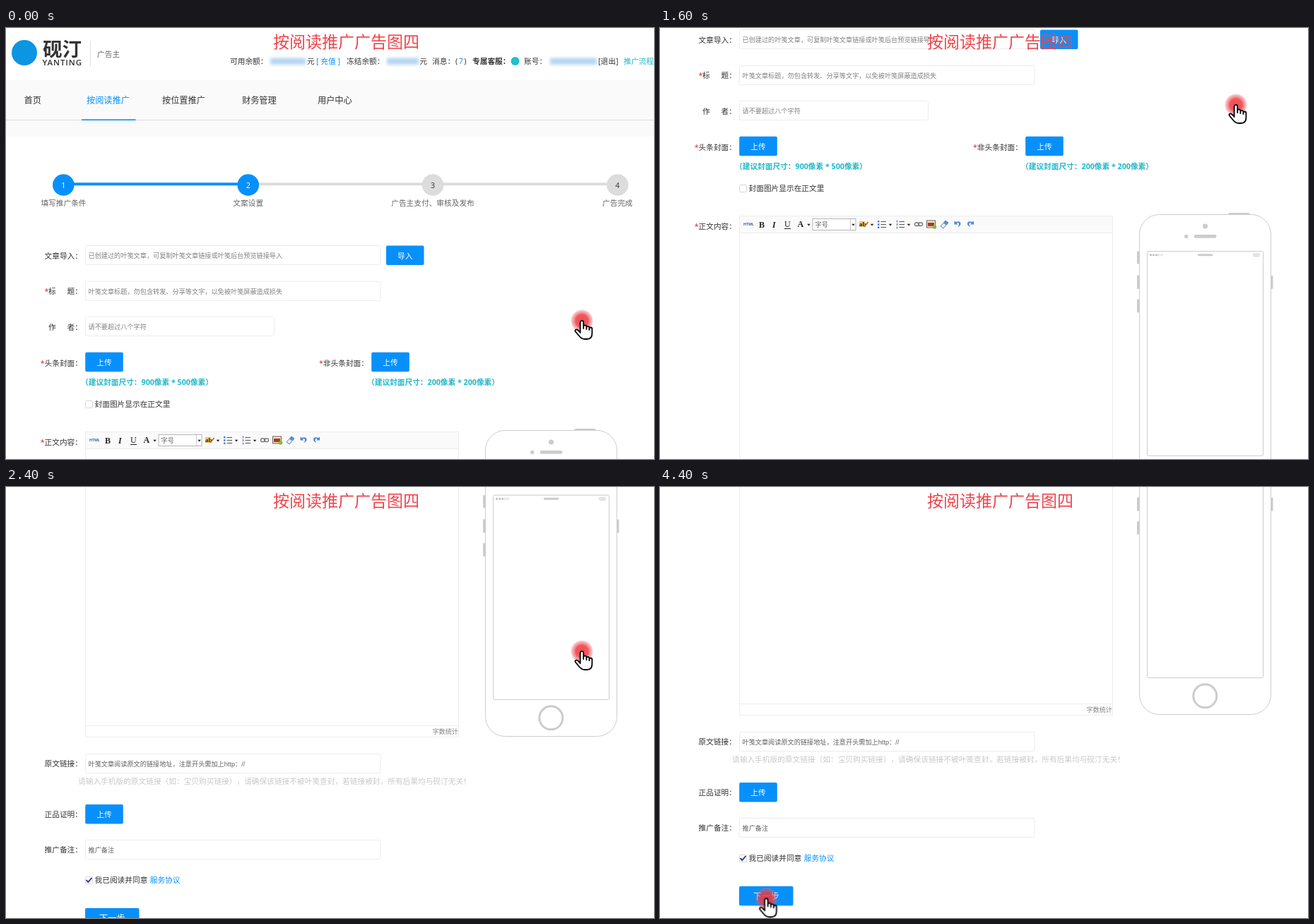
Animation, 917 px wide and 611 px high, one loop 7.4 s. Source, as an HTML page:

```html
<!DOCTYPE html>
<html lang="zh-CN">
<head>
<meta charset="utf-8">
<title>按阅读推广广告图四</title>
<style>
  html, body { margin: 0; width: 100%; height: 100%; overflow: hidden; background: #fff; }
  svg { display: block; }
  text {
    font: 10.7px "Open Sans", "Noto Sans CJK SC", "Noto Sans CJK", sans-serif;
    text-spacing-trim: space-all;
    white-space: pre;
    fill: #333;
  }
  /* centred full-width colon and exclamation mark */
  .c { font-family: "Noto Sans CJK JP", "Noto Sans CJK SC", sans-serif; }
  .label { text-anchor: end; }
  .mid { text-anchor: middle; }
  .white { fill: #fff; }
  .blue { fill: #0890fa; }
  .teal { fill: #1fb8cb; }
  .red { fill: #e02020; }
  .grey { fill: #666; }
  .pale { fill: #c8c8c8; }
  .bold { font-weight: 700; }
  .nav text { font-size: 12.2px; }
  .hint { font-family: "Liberation Sans", "Noto Sans CJK SC", "Noto Sans CJK", sans-serif; font-size: 9.17px; fill: #808080; }
  .dark { fill: #606060; }
  .next { font-size: 12.2px; }
  .serif { font: bold 12px "Liberation Serif", serif; fill: #222; }
  .italic { font-style: italic; }
  .thin { font-weight: 400; }
  .small { font-size: 9px; }
  .brand { font-size: 27.5px; }
  .latin { font-size: 11.5px; font-weight: 600; letter-spacing: .9px; }
  .code { font-size: 5.2px; font-weight: 700; fill: #3563a8; }
  .title { font-size: 23px; fill: #f0444a; }
  .field { fill: #fff; stroke: #ececec; }
  .box { fill: #fff; stroke: #d6d6d6; }
  .line { fill: none; stroke: #ccc; }
  .solid { fill: #ccc; }
  .blur { fill: #b5d6f2; filter: blur(2.2px); }

  #page, #cursor, #ring { animation: 7.4s step-end infinite; }
  #page { animation-name: scroll; }
  #cursor { animation-name: point; }
  #ring { animation-name: press; }

  @keyframes scroll {
    0% { transform: translateY(0); }
    13.5135% { transform: translateY(-76px); }
    16.2162% { transform: translateY(-153px); }
    18.9189% { transform: translateY(-229px); }
    21.6216% { transform: translateY(-306px); }
    24.3243% { transform: translateY(-382px); }
    27.027% { transform: translateY(-458px); }
    29.7297% { transform: translateY(-535px); }
    32.4324% { transform: translateY(-611px); }
    35.1351% { transform: translateY(-626px); }
    37.8378%, 100% { transform: translateY(-642px); }
  }
  @keyframes point {
    0% { transform: translate(815px, 415px); }
    27.027% { transform: translate(815px, 844px); }
    51.3513%, 100% { transform: translate(150.5px, 1225.5px); }
  }
  @keyframes press {
    0% { transform: scale(1); }
    51.3513% { transform: scale(.45); }
    54.054% { transform: scale(.68); }
    56.7567% { transform: scale(.87); }
    59.4594%, 100% { transform: scale(1); }
  }
</style>
</head>
<body>
<svg width="917" height="611" viewBox="0 0 917 611">
  <defs>
    <radialGradient id="glow">
      <stop offset="0" stop-color="#ee343a" stop-opacity=".88"/>
      <stop offset=".56" stop-color="#ee3a40" stop-opacity=".85"/>
      <stop offset=".74" stop-color="#f04a50" stop-opacity=".6"/>
      <stop offset=".9" stop-color="#f26066" stop-opacity=".42"/>
      <stop offset="1" stop-color="#f26066" stop-opacity=".25"/>
    </radialGradient>
    <circle id="dot" r="15.3"/>
    <path id="caret" d="M-2.3-1.2h4.6L0 1.5z" fill="#222"/>
    <path id="rows" d="M0-4h7.5M0 0h7.5M0 4h7.5" stroke="#555" stroke-width="1.1"/>
    <path id="turn" d="M-4-4.5v5h5l-1.8-1.8q3-1.6 3.4 1 .2 2.2-2 4 4.6-1 4.4-4.8Q4.2-5.5-2.3-2.9z" fill="#4d87d6"/>
    <g id="upload">
      <rect width="53.6" height="27.5" rx="2" class="blue"/>
      <text x="26.8" y="18.2" class="mid white">上传</text>
    </g>
  </defs>

  <g id="page">
    <!-- header -->
    <circle cx="26" cy="35" r="18" fill="#0c95e2"/>
    <text x="52" y="40" class="bold brand">砚汀</text>
    <text x="51.5" y="52.5" class="latin">YANTING</text>
    <path d="M119.5 19v35" stroke="#ddd"/>
    <text x="129" y="40.5" class="grey">广告主</text>
    <text x="317" y="51">可用余额<tspan class="c">：</tspan></text>
    <rect x="374" y="42.5" width="50" height="9.5" class="blur"/>
    <text x="426" y="51">元</text>
    <text x="439" y="51" class="blue">[ 充值 ]</text>
    <text x="482" y="51">冻结余额<tspan class="c">：</tspan></text>
    <rect x="539" y="42.5" width="45" height="9.5" class="blur"/>
    <text x="585.5" y="51">元</text>
    <text x="603" y="51">消息<tspan class="c">：</tspan></text>
    <text x="636" y="51" letter-spacing="1.5">(<tspan class="blue">7</tspan>)</text>
    <text x="660" y="51" class="bold">专属客服<tspan class="c">：</tspan></text>
    <circle cx="720.5" cy="47" r="6" fill="#22bfcd"/>
    <text x="733" y="51">账号<tspan class="c">：</tspan></text>
    <rect x="770" y="42.5" width="66" height="9.5" class="blur"/>
    <text x="838" y="51">[退出]</text>
    <text x="874" y="51" class="teal">推广流程</text>

    <!-- navigation -->
    <rect y="73.5" width="917" height="80.5" fill="#fafafa"/>
    <path d="M0 130.5h917" stroke="#dcdcdc"/>
    <rect x="107" y="129.4" width="76.5" height="1.6" class="blue"/>
    <g class="nav">
      <text x="25.5" y="107">首页</text>
      <text x="114" y="107" class="blue">按阅读推广</text>
      <text x="221" y="107">按位置推广</text>
      <text x="334" y="107">财务管理</text>
      <text x="441" y="107">用户中心</text>
    </g>

    <!-- steps -->
    <path d="M342 221.2h523" stroke="#dcdcdc" stroke-width="4"/>
    <path d="M81 221.2h261" stroke="#0890fa" stroke-width="4"/>
    <g class="blue"><use href="#dot" x="81.3" y="222.5"/><use href="#dot" x="342.7" y="222.5"/></g>
    <g fill="#dcdcdc"><use href="#dot" x="604" y="222.5"/><use href="#dot" x="865.4" y="222.5"/></g>
    <g class="mid">
      <text x="81.3" y="226.5" class="white">1</text>
      <text x="342.7" y="226.5" class="white">2</text>
      <text x="604" y="226.5">3</text>
      <text x="865.4" y="226.5">4</text>
      <text x="81.5" y="252" class="grey">填写推广条件</text>
      <text x="342.7" y="252" class="grey">文案设置</text>
      <text x="604" y="252" class="grey">广告主支付、审核及发布</text>
      <text x="865.4" y="252" class="grey">广告完成</text>
    </g>

    <!-- article fields -->
    <text x="108" y="327" class="label">文章导入<tspan class="c">：</tspan></text>
    <rect x="112.5" y="308.5" width="417.5" height="27" rx="2" class="field"/>
    <text x="116.5" y="326" class="hint">已创建过的叶笺文章，可复制叶笺文章链接或叶笺后台预览链接导入</text>
    <rect x="538" y="308.5" width="53.5" height="27.5" rx="2" class="blue"/>
    <text x="564.8" y="326.5" class="mid white">导入</text>

    <text x="54.5" y="377"><tspan class="red">*</tspan><tspan x="60">标</tspan><tspan x="86.5">题</tspan><tspan class="c">：</tspan></text>
    <rect x="112.5" y="359.5" width="417.5" height="27" rx="2" class="field"/>
    <text x="116.5" y="376.5" class="hint">叶笺文章标题，勿包含转发、分享等文字，以免被叶笺屏蔽造成损失</text>

    <text x="60" y="428">作<tspan x="86.5">者</tspan><tspan class="c">：</tspan></text>
    <rect x="112.5" y="409.5" width="267" height="27" rx="2" class="field"/>
    <text x="116.5" y="427" class="hint">请不要超过八个字符</text>

    <text x="108" y="478.5" class="label"><tspan class="red">*</tspan>头条封面<tspan class="c">：</tspan></text>
    <use href="#upload" x="112.2" y="459.8"/>
    <text x="513" y="478.5" class="label"><tspan class="red">*</tspan>非头条封面<tspan class="c">：</tspan></text>
    <use href="#upload" x="517.2" y="459.8"/>
    <text x="106" y="506" class="teal bold">（建议封面尺寸<tspan class="c">：</tspan>900像素 * 500像素）</text>
    <text x="511" y="506" class="teal bold">（建议封面尺寸<tspan class="c">：</tspan>200像素 * 200像素）</text>

    <rect x="112.5" y="528.5" width="10" height="10" rx="1" class="box"/>
    <text x="125.5" y="537">封面图片显示在正文里</text>

    <!-- editor -->
    <text x="108" y="590.5" class="label"><tspan class="red">*</tspan>正文内容<tspan class="c">：</tspan></text>
    <rect x="112.5" y="572.5" width="528" height="393" class="field"/>
    <rect x="113" y="573" width="527" height="23" fill="#fafafa"/>
    <path d="M113 596.5h527M113 949.5h527" stroke="#ececec"/>
    <text x="640" y="961" class="hint label">字数统计</text>
    <text x="118" y="586" class="code">HTML</text>
    <text x="140" y="588.5" class="serif">B</text>
    <text x="159" y="588.5" class="serif italic">I</text>
    <text x="176" y="588" class="serif thin">U</text>
    <path d="M176 590.5h9" stroke="#222"/>
    <text x="194.5" y="588" class="serif">A</text>
    <use href="#caret" x="210.5" y="585"/>
    <rect x="216" y="576.5" width="61" height="16" fill="#fff" stroke="#b5b5b5"/>
    <path d="M269.5 577v15" stroke="#ccc"/>
    <text x="219.5" y="588" class="hint dark">字号</text>
    <use href="#caret" x="273.5" y="585"/>
    <rect x="282" y="580" width="8" height="8" fill="#f2c766"/>
    <text x="282" y="587" class="serif small">ab</text>
    <path d="M289 588l5.500-7" stroke="#b06c28" stroke-width="1.8"/>
    <use href="#caret" x="300" y="585"/>
    <path d="M309.2 579v2.5M309.2 583.2v2.5M309.2 587.4v2.5" stroke="#4a7fd0" stroke-width="2.4"/>
    <use href="#rows" x="312.5" y="584.5"/>
    <use href="#caret" x="326" y="585"/>
    <path d="M335.5 578.5v3M335.5 583v3M335.5 587.5v3" stroke="#4a7fd0" stroke-width="1.3"/>
    <use href="#rows" x="338.5" y="584.5"/>
    <use href="#caret" x="352" y="585"/>
    <g fill="none" stroke="#777" stroke-width="1.3">
      <rect x="360.5" y="582" width="6" height="4.5" rx="2"/>
      <rect x="365.5" y="582" width="6" height="4.5" rx="2"/>
    </g>
    <rect x="377.5" y="579" width="12" height="10" fill="#f7e3b4" stroke="#666"/>
    <path d="M379 582h9v5h-9z" fill="#a33c2c"/>
    <circle cx="388.5" cy="588" r="2.8" fill="#7dbd3a"/>
    <path d="M397 587l7-8 4 3-7 8z" fill="#e6edf8" stroke="#5b7fb5"/>
    <path d="M404 579l4 3-3 3.500-4-3z" fill="#5c8dd6"/>
    <use href="#turn" x="420.5" y="584"/>
    <use href="#turn" transform="translate(440 584) scale(-1 1)"/>

    <!-- phone -->
    <g class="solid">
      <path d="M804 570.5q0-2.5 3-2.5h25q3 0 3 2.500z"/>
      <rect x="675" y="622.5" width="3" height="18" rx="1"/>
      <rect x="675" y="656.5" width="3" height="19.5" rx="1"/>
      <rect x="675" y="690.5" width="3" height="19" rx="1"/>
      <rect x="865" y="657" width="2.5" height="19" rx="1"/>
      <circle cx="771.5" cy="587" r="3.6"/>
      <circle cx="744.7" cy="601.5" r="2.7"/>
      <rect x="755.5" y="599" width="32" height="4.8" rx="2.4"/>
      <rect x="761" y="626.3" width="21" height="3" rx="1"/>
    </g>
    <rect x="678.5" y="570.5" width="186" height="394" rx="28" class="line"/>
    <rect x="689.5" y="622.5" width="164" height="290" rx="1" class="line"/>
    <circle cx="771.3" cy="938.3" r="16.5" class="line" stroke-width="3"/>
    <path d="M694.5 627.8h10" stroke="#bbb" stroke-width="3" stroke-linecap="round" stroke-dasharray="0 4"/>
    <g class="line" stroke-width=".7"><circle cx="706" cy="627.8" r="1.3"/><circle cx="710" cy="627.8" r="1.3"/></g>
    <rect x="839.5" y="626" width="9" height="3.5" rx="1" class="line"/>
    <path d="M841 627.8h6" stroke="#ccc"/>

    <!-- closing fields -->
    <text x="108" y="1007" class="label">原文链接<tspan class="c">：</tspan></text>
    <rect x="112.5" y="989.5" width="417.5" height="27" rx="2" class="field"/>
    <text x="116.5" y="1006.5" class="hint dark">叶笺文章阅读原文的链接地址，注意开头需加上http：//</text>
    <text x="102" y="1031.5" class="pale">请输入手机版的原文链接（如<tspan class="c">：</tspan>宝贝购买链接），请确保该链接不被叶笺查封，若链接被封，所有后果均与砚汀无关<tspan class="c">！</tspan></text>

    <text x="108" y="1078.5" class="label">正品证明<tspan class="c">：</tspan></text>
    <use href="#upload" x="112.2" y="1061"/>

    <text x="108" y="1129" class="label">推广备注<tspan class="c">：</tspan></text>
    <rect x="112.5" y="1111.5" width="417.5" height="27" rx="2" class="field"/>
    <text x="116.5" y="1128.5" class="hint dark">推广备注</text>

    <rect x="112.5" y="1163.5" width="10" height="10" rx="1" class="box"/>
    <path d="M113.5 1168.2l2.8 2.8 5.2-6" fill="none" stroke="#29398c" stroke-width="1.9"/>
    <text x="125.5" y="1172">我已阅读并同意</text>
    <text x="203.7" y="1172" class="blue">服务协议</text>

    <rect x="112" y="1208" width="76.5" height="27.5" rx="2" class="blue"/>
    <text x="150.3" y="1226.5" class="mid white next">下一步</text>

    <g id="cursor">
      <circle id="ring" r="15.5" fill="url(#glow)"/>
      <path d="M-2.4 17V2.2a2.3 2.3 0 0 1 4.6 0V11V8.5a2.1 2.1 0 0 1 4.2 0V12V9.8a2 2 0 0 1 4 0V13V11.5a2 2 0 0 1 4 0V18C14.4 23 12 26 7 26H4C0 26-2 24-4 21.5L-9 15.5C-10.5 13-8 11.5-6 13L-2.4 16.5Z" fill="#fff" stroke="#000" stroke-width="1.8" stroke-linejoin="round"/>
    </g>
  </g>

  <text x="378" y="28.2" class="title">按阅读推广广告图四</text>
</svg>
</body>
</html>
```
